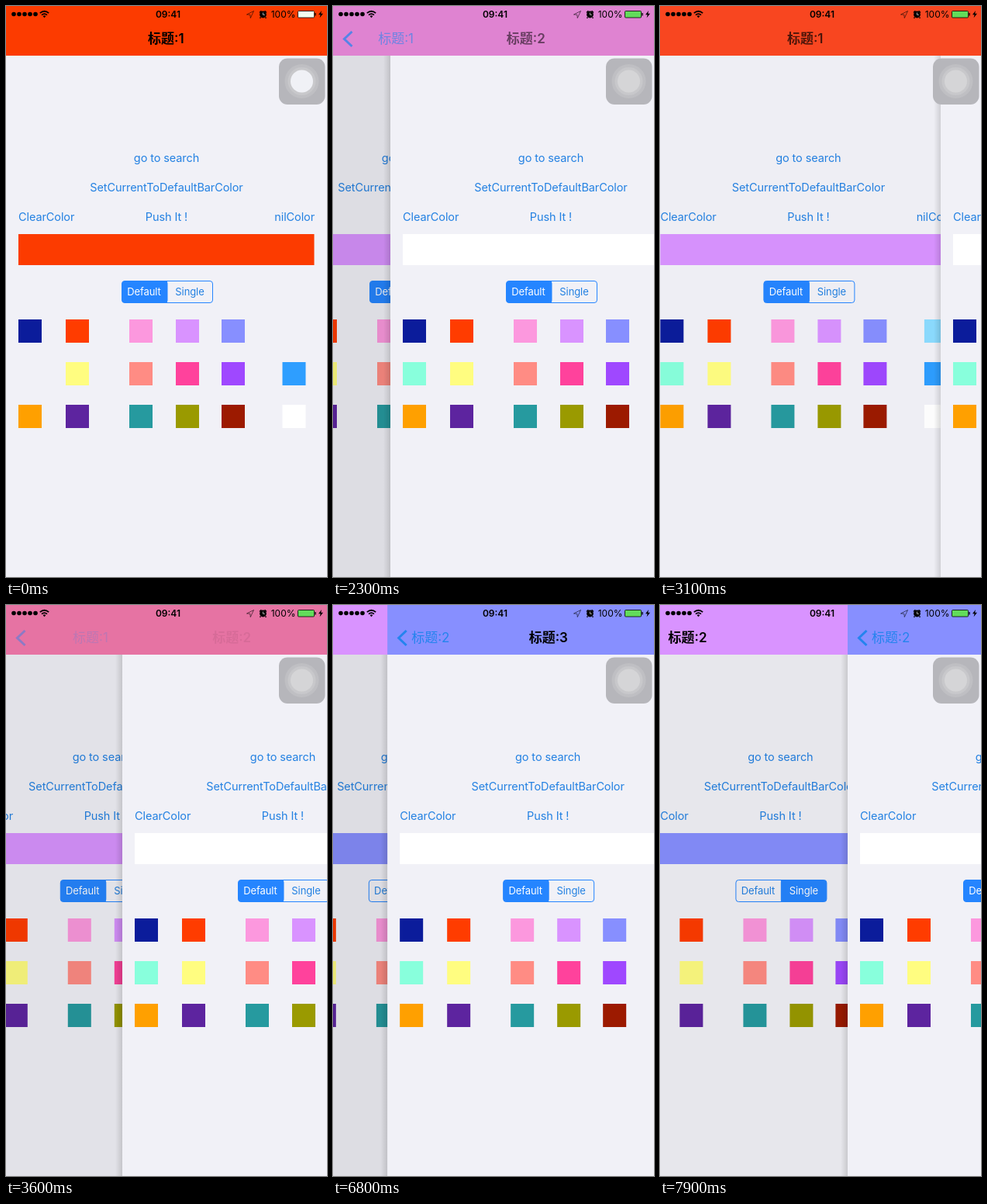
Recreate the animation shown at these times as an HTML page. Size 414 by 736 pixels, loop 8000 ms.

```html
<!DOCTYPE html>
<html lang="zh">
<head>
<meta charset="utf-8">
<style>
html, body { margin: 0; width: 100%; height: 100%; overflow: hidden; background: #f1f1f7; }
svg { display: block; width: 100vw; height: 100vh; }
text { font-family: Inter, "Noto Sans CJK SC", "Noto Sans CJK", sans-serif; white-space: pre; }
.link { font-size: 14.5px; letter-spacing: -.1px; fill: #2381e2; }
.seg { font-size: 13px; letter-spacing: -.1px; }
.title { font-size: 17px; font-weight: 600; }
.back { font-size: 17px; fill: #2484ee; }
.status { font-size: 12px; }
</style>
</head>
<body>
<svg id="stage" viewBox="0 0 414 736" preserveAspectRatio="none"></svg>
<script>
const W = 414, LOOP = 8000, BLUE = '#2585ff';
const COLS = [16, 77, 159, 219, 278, 356.5];
const ROWS = [404, 459, 514];
const SWATCHES = [
  ['#0b1c9b', '#ff3c00', '#fc98de', '#d993ff', '#878fff', '#8cdcff'],
  ['#88ffdc', '#fffd80', '#ff8c84', '#ff429c', '#9f48ff', '#2e9eff'],
  ['#ffa000', '#5d249f', '#269a9f', '#9a9a00', '#9c1a00', '#ffffff']
];
const BARS = [null, [252, 59, 0], [217, 147, 255], [135, 143, 255]];
// finger position while the second page is dragged aside and back
const DRAG = [[2100, 0], [2300, 74], [3000, 355], [3100, 362], [3200, 350], [3900, 0]];

const clamp = v => Math.max(0, Math.min(1, v));
const rgb = c => `rgb(${c.map(Math.round)})`;
const mix = (a, b, k) => a.map((v, i) => v + (b[i] - v) * k);
const rect = (x, y, w, h, fill, more = '') =>
  `<rect x="${x}" y="${y}" width="${w}" height="${h}" fill="${fill}" ${more}/>`;
const text = (cls, x, y, s, more = '') => `<text class="${cls}" x="${x}" y="${y}" ${more}>${s}</text>`;
const group = (x, inner) => `<g transform="translate(${x})">${inner}</g>`;
const alpha = a => `opacity="${clamp(a)}"`;
const MID = 'text-anchor="middle"', END = 'text-anchor="end"';

function track(keys, t) {
  for (let i = 1; i < keys.length; i++) {
    const [a, u] = keys[i - 1], [b, v] = keys[i];
    if (t >= a && t <= b) return u + (v - u) * (t - a) / (b - a);
  }
  return 0;
}

const settle = (t, start, rate) => W * Math.exp(-rate * (t - start) / 1000);

// left edge of the upper page
function edge(t) {
  if (t < 900) return W;
  if (t <= 1600) return settle(t, 900, 5.32);
  if (t < 6600) return track(DRAG, t);
  if (t <= 7300) return settle(t, 6550, 7.1);
  return t < 7500 ? 0 : (t - 7400) * .484;
}

function segments(single) {
  const x = single ? 207.5 : 149.5;
  return rect(149.5, 354.5, 117, 28, 'none', `rx="3.5" stroke="${BLUE}"`) +
    rect(x, 354.5, 59, 28, BLUE, 'rx="3.5"') + rect(single ? 207.5 : 202, 354.5, 6, 28, BLUE) +
    text('seg', 178, 373.4, 'Default', `${MID} fill="${single ? '#2381e2' : '#fff'}"`) +
    text('seg', 237, 373.4, 'Single', `${MID} fill="${single ? '#fff' : '#2381e2'}"`);
}

function page(n, t) {
  const band = n === 1 ? (t < 500 ? '#fc3b00' : '#d993ff') : n === 2 && t >= 4900 ? '#878fff' : '#fff';
  const hidden = (r, c) => n === 1 && t < 500 && (r === 1 && c === 0 || r === 0 && c === 5) ||
    n === 2 && t >= 5200 && t < 6600 && r === 1 && c === 0;
  const tiles = SWATCHES.map((row, r) => row.map((fill, c) =>
    hidden(r, c) ? '' : rect(COLS[c], ROWS[r], 30, 30, fill)).join('')).join('');
  return rect(0, 64, W, 672, '#f1f1f7') +
    text('link', 207, 200.5, 'go to search', MID) +
    text('link', 207, 238.5, 'SetCurrentToDefaultBarColor', MID) +
    text('link', 16, 276.5, 'ClearColor') +
    text('link', 207, 276.5, 'Push It !', MID) +
    text('link', 398, 276.5, 'nilColor', END) +
    rect(16, 294, 381.5, 40, band) + segments(n === 2 && t >= 4200) + tiles;
}

const chevron = a => `<path d="M24.5 33L14.5 42.5L24.5 52" fill="none" stroke="#2484ee" stroke-width="3" ${alpha(a)}/>`;

// one shared bar whose colour and titles cross-fade
function blendBar(x, t) {
  const k = x / W, push = t < 2000, q = push ? k ** .9 : k;
  const left = 31 + 152 * q;
  return rect(0, 0, W, 64, rgb(mix(BARS[2], BARS[1], k))) +
    chevron(push ? 1 - q * 5 : 1 - q * 1.5) +
    text('back', left, 48, '标题:1', alpha(1 - q * (push ? 1 : 2.2))) +
    text('title', left, 48, '标题:1', alpha((q - .6) / .4)) +
    text('title', 182.5 + 231 * q, 48, '标题:2', alpha(1 - q * (push ? 1.3 : 2.6)));
}

// every page carries its own bar
function singleBar(x) {
  const bar = n => rect(0, 0, W, 64, rgb(BARS[n]));
  const items = n => chevron(1) + text('back', 31, 48, '标题:' + (n - 1)) +
    text('title', 182.5, 48, '标题:' + n);
  return bar(2) + group(x - W, items(2)) + group(x, bar(3) + items(3));
}

function status(t) {
  const dots = [10, 17, 24, 31, 38].map(x => `<circle cx="${x}" cy="10.5" r="2.8"/>`).join('');
  return dots +
    `<g fill="none" stroke="#000" stroke-width="1.7">
      <path d="M43.8 9.2Q49.5 4.3 55.2 9.2M46 11.6Q49.5 8.6 53 11.6"/></g>
    <path d="M47.6 13.1Q49.5 11.6 51.4 13.1L49.5 15.2Z"/>` +
    text('status', 209, 15, '09:41', `${MID} font-weight="600"`) +
    `<path d="M310.5 11L319.5 6.5L315.3 15.5L314.8 11.2Z" fill="none" stroke="#000" stroke-width=".8" opacity=".7"/>
    <circle cx="331.5" cy="11" r="4.4"/>
    <path d="M327 8.4L329.4 6.2M336 8.4L333.6 6.2M328.5 14.5L327.5 15.7M334.5 14.5L335.5 15.7" stroke="#000" stroke-width="1.4"/>
    <path d="M331.5 8.5V11.3H334" fill="none" stroke="#fff" stroke-opacity=".65"/>` +
    text('status', 373.5, 15, '100%', END) +
    rect(376.5, 6.5, 21, 8.5, t < 500 ? '#f4fff0' : '#62dc5a', 'rx="1" stroke="#000" stroke-width=".8"') +
    rect(398.4, 9, 1.3, 3.5, '#000') +
    '<path d="M407 6L403 11.3H405.6L404.6 15.3L409 9.7H406.2Z"/>';
}

function touchButton(t) {
  const ring = (r, fill) => `<circle cx="381.5" cy="97" r="${r}" fill="${fill}"/>`;
  return rect(352, 67.5, 59.5, 59.5, '#b6b6bb', 'rx="11"') + ring(22, '#bfbfc3') +
    ring(18, '#c8c8cb') + ring(14.5, t < 500 ? '#f0f1f6' : '#d5d5d7');
}

function scene(t) {
  const n = t < 6600 ? 2 : 3, x = edge(t), moving = x > 0 && x < W;
  return `<defs><linearGradient id="shade"><stop stop-opacity="0"/><stop offset="1" stop-opacity=".13"/></linearGradient></defs>` +
    group((x - W) * .3, page(n - 1, t)) +
    rect(0, 64, W, 672, '#000', alpha(.1 * (1 - x / W))) +
    (moving ? rect(x - 9, 64, 9, 672, 'url(#shade)') : '') +
    group(x, page(n, t)) +
    (n === 2 ? blendBar(x, t) : singleBar(x)) + status(t) + touchButton(t);
}

const stage = document.getElementById('stage');
let shown = -1;
function draw() {
  // the screen refreshes ten times a second
  const t = Math.floor(performance.now() % LOOP / 100) * 100;
  if (t !== shown) stage.innerHTML = scene(shown = t);
  requestAnimationFrame(draw);
}
draw();
</script>
</body>
</html>
```
